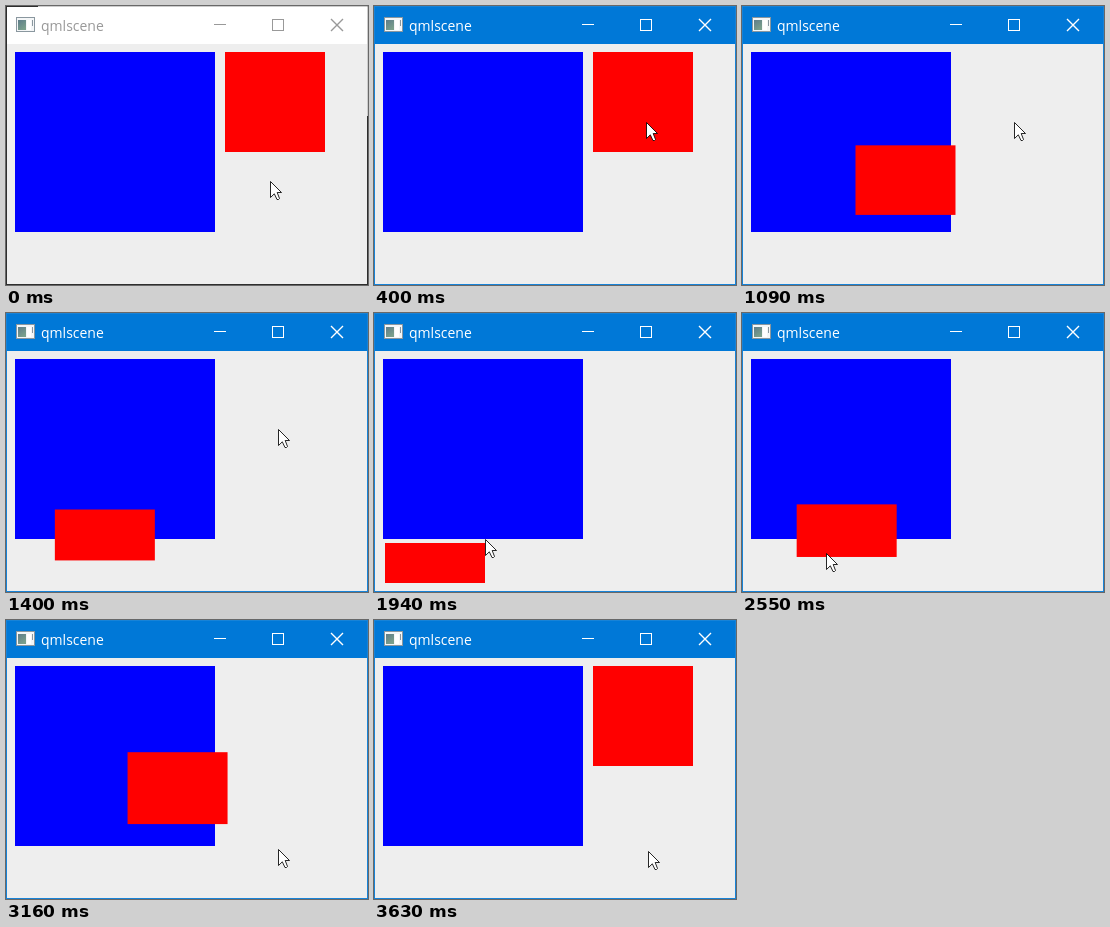
An HTML page that plays this animation: 362 px wide and 279 px high, repeating every 3700 ms.

```html
<!DOCTYPE html>
<html lang="en">
<head>
<meta charset="utf-8">
<title>qmlscene</title>
<style>
  html, body { margin: 0; width: 100%; height: 100%; overflow: hidden; }
  svg { display: block; width: 362px; height: 279px; }
  #window { --bar: #fff; --edge: #2e2e2e; --lit-edge: #ccc; --ink: #999; }
  #window.active { --bar: #0078d7; --edge: #1883d7; --lit-edge: #1883d7; --ink: #fff; }
  .edge { fill: var(--edge); }
  .lit-edge { fill: none; stroke: var(--lit-edge); }
  .bar { fill: var(--bar); }
  .title { fill: var(--ink); font: 14px "Open Sans", "Noto Sans", sans-serif; }
  .buttons { fill: none; stroke: var(--ink); }
</style>
</head>
<body>
<svg id="window" viewBox="0 0 362 279">
  <defs>
    <linearGradient id="pane" x2="0.6" y2="1">
      <stop offset="0" stop-color="#5d7c8a"/>
      <stop offset="1" stop-color="#7ba08c"/>
    </linearGradient>
  </defs>
  <rect class="edge" width="362" height="279"/>
  <path class="lit-edge" d="M32 .5H361.5V110"/>
  <rect class="bar" x="1" y="1" width="360" height="37"/>
  <rect x="1" y="38" width="360" height="240" fill="#eee"/>

  <g id="icon">
    <rect x="10.5" y="11.5" width="18" height="14" fill="#f4f6f7" stroke="#8a979f"/>
    <rect x="12" y="14" width="8" height="10" fill="url(#pane)"/>
    <rect x="21" y="14" width="4" height="10" fill="#fff"/>
    <rect x="26" y="14" width="1" height="6" fill="#8a979f"/>
  </g>
  <text class="title" x="35" y="25">qmlscene</text>
  <g class="buttons">
    <path d="M208 18.5h12"/>
    <rect x="266.5" y="13.5" width="11" height="11"/>
    <path d="M325.5 13.5l11 11m0-11l-11 11" stroke-width="1.4" stroke-linecap="square"/>
  </g>

  <rect x="9" y="46" width="200" height="180" fill="#00f"/>
  <rect id="box" width="100" fill="#f00"/>
  <path id="cursor" d="M.5 .5V16.5L4.3 12.8L7 18.5H8.5L9.5 17.5L7.2 11.5H11.5Z"
        fill="#fff" stroke="#000" stroke-width=".85"/>
</svg>
<script>
  const LOOP = 3700, TICK = 77;
  const ACTIVATE = 380, FORWARD = 456, BACKWARD = 2458, DURATION = 1000;

  // [time, x, y]
  const pointer = [
    [0, 264, 175], [230, 272, 116], [1400, 272, 116], [1925, 111, 226],
    [2230, 84, 240], [2600, 84, 240], [2770, 88, 259], [3150, 272, 229],
    [3230, 274, 231], [LOOP, 274, 231]
  ];

  const win = document.getElementById("window");
  const box = document.getElementById("box");
  const cursor = document.getElementById("cursor");

  const mix = (a, b, k) => a + (b - a) * k;
  const clamp = k => Math.min(1, Math.max(0, k));
  const smooth = k => k * k * (3 - 2 * k);
  const outInCubic = k => 0.5 + 0.5 * (2 * k - 1) ** 3;
  const transition = (t, start) => outInCubic(clamp((t - start) / DURATION));

  function pointerAt(t) {
    const next = pointer.findIndex(key => key[0] > t);
    const [t0, x0, y0] = pointer[next - 1];
    const [t1, x1, y1] = pointer[next];
    const k = smooth((t - t0) / (t1 - t0));
    return [mix(x0, x1, k), mix(y0, y1, k)].map(Math.round);
  }

  function render(time) {
    const t = Math.floor(time / TICK) * TICK;
    const p = transition(t, FORWARD) - transition(t, BACKWARD);

    win.classList.toggle("active", t >= ACTIVATE);
    box.setAttribute("x", mix(219, 11, p));
    box.setAttribute("y", mix(46, 230, p));
    box.setAttribute("height", mix(100, 40, p));
    cursor.setAttribute("transform", `translate(${pointerAt(t)})`);
  }

  const start = performance.now();
  function frame() {
    render((performance.now() - start) % LOOP);
    requestAnimationFrame(frame);
  }
  frame();
</script>
</body>
</html>
```
